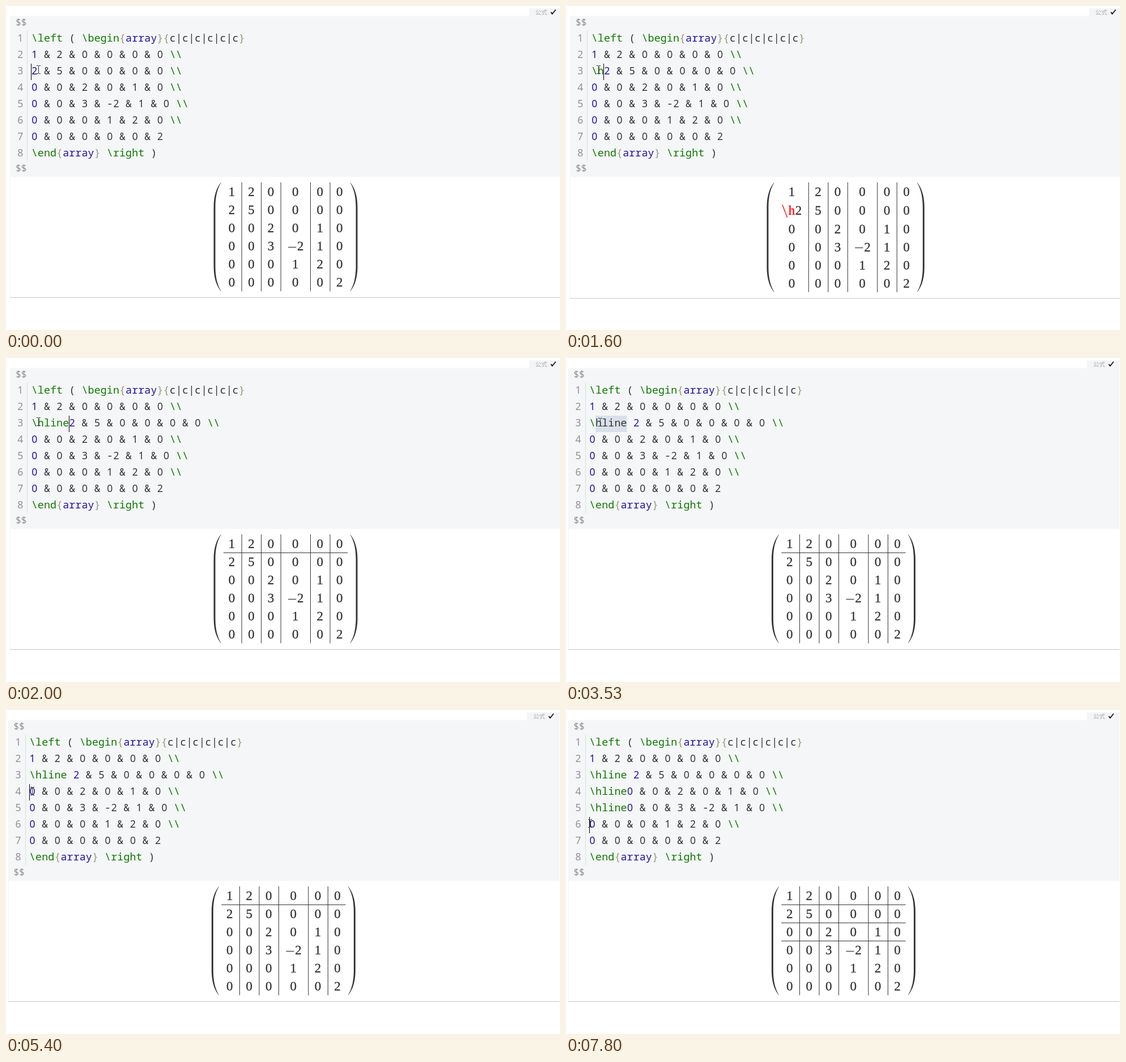
These frames come from a looping animation (978 px wide and 573 px high, 8 s). An HTML page with a canvas:

```html
<!DOCTYPE html>
<html lang="en">
<head>
<meta charset="utf-8">
<title>Matrix editor</title>
<style>
html, body { margin: 0; width: 100%; height: 100%; overflow: hidden; background: #fff; }
canvas { display: block; }
</style>
</head>
<body>
<canvas id="stage" width="978" height="573"></canvas>
<script>
const ctx = document.getElementById('stage').getContext('2d');

const LOOP = 8000, TICKS_PER_MS = 15 / 1000;
const CELL = 11.09, LINE = 29, EM = 23, INDENT = 37.3;
const LEFT = 7.4, LEFT_SCROLL = 3.7;
const MONO = '"Noto Sans Mono", "DejaVu Sans Mono", monospace';
const SANS = '"Noto Sans", "Open Sans", sans-serif';
const SERIF = '"Liberation Serif", "Noto Serif", serif';
const INK = '#333', GREEN = '#117700', BLUE = '#221199', BRACE = '#999977';

const ROWS = ['1 2 0 0 0 0', '2 5 0 0 0 0', '0 0 2 0 1 0',
  '0 0 3 -2 1 0', '0 0 0 1 2 0', '0 0 0 0 0 2'].map(r => r.split(' '));

// Times below are in ticks of 1/15 s.
const EDITS = [19, 24, 25, 27, 28, 30, 37, 86, 100];
const CARETS = [[-6, 3, 0], [19, 3, 1], [24, 3, 2], [25, 3, 3], [27, 3, 4], [28, 3, 5],
  [30, 3, 6], [37, 3, 7], [61, 3, 6], [81, 4, 0], [86, 4, 6], [95, 5, 0], [100, 5, 6], [117, 6, 0]];
const MOUSE = [[0, 57, 112], [44, 57, 112], [48, 59, 113], [52, 59, 113], [53, 60, 113],
  [59, 108, 114], [61, 108, 114], [73, 43, 114], [75, 43, 114], [81, 46, 143], [86, 46, 143],
  [89, 48, 152], [92, 48, 152], [95, 47, 173], [102, 47, 173], [108, 46, 201],
  [111, 46, 201], [113, 46, 200], [114, 46, 200], [117, 42, 200], [120, 42, 200]];

function rect(x, y, w, h, color) {
  ctx.fillStyle = color;
  ctx.fillRect(x, y, w, h);
}

function text(s, x, y, font, color, align = 'center') {
  ctx.font = font;
  ctx.fillStyle = color;
  ctx.textAlign = align;
  ctx.fillText(s, x, y);
}

function mouseAt(tick) {
  const i = MOUSE.findIndex(k => k[0] > tick);
  const [t0, x0, y0] = MOUSE[i - 1], [t1, x1, y1] = MOUSE[i];
  const p = (tick - t0) / (t1 - t0);
  return [Math.round(x0 + (x1 - x0) * p), Math.round(y0 + (y1 - y0) * p)];
}

function selection(tick, mouseX) {
  if (tick >= 48 && tick < 61) return [1, 6];
  if (tick > 61 && tick < 81) {
    return [Math.max(0, Math.round((mouseX - LEFT_SCROLL - INDENT) / CELL)), 6];
  }
  return null;
}

// Each line is a list of [string, color] tokens.
function codeLines(edits) {
  const prefix = ['', '\\hline '.slice(0, Math.min(edits, 7)),
    edits > 7 ? '\\hline' : '', edits > 8 ? '\\hline' : '', '', ''];
  const body = ROWS.map((row, i) => [
    [prefix[i], GREEN],
    [row[0], prefix[i] === '\\' ? GREEN : BLUE],
    [' & ' + row.slice(1).join(' & ') + ' ', INK],
    [i < 5 ? '\\\\' : '', GREEN]
  ]);
  const array = [['{', BRACE], ['array', BLUE], ['}', BRACE]];
  return [
    [['\\left', GREEN], [' ( ', INK], ['\\begin', GREEN], ...array,
      ['{', BRACE], ['c|c|c|c|c|c', INK], ['}', BRACE]],
    ...body,
    [['\\end', GREEN], ...array, [' ', INK], ['\\right', GREEN], [' )', INK]]
  ];
}

function codeChar(ch, x, y, color) {
  const font = /[0-9]/.test(ch) ? '17.6px ' + SANS : '18.4px ' + MONO;
  text(ch, x, y, font, color);
}

function drawEditor(edits, left, right, sel) {
  const x0 = left + INDENT;
  rect(left + 916, 4, right - left - 916, 14, '#f4f5f7');
  rect(left, 18, right - left, 284.5, '#f4f6f8');
  text('公式', left + 927, 15, '10.5px "Noto Sans CJK SC", "Noto Sans CJK", sans-serif', '#aaa', 'left');
  ctx.strokeStyle = '#222';
  ctx.lineWidth = 2;
  ctx.beginPath();
  ctx.moveTo(left + 954.5, 11);
  ctx.lineTo(left + 957, 14);
  ctx.lineTo(left + 963, 6.5);
  ctx.stroke();

  rect(Math.round(left + 30), 43, 1, 232, '#dcdddf');
  for (const y of [35, 293]) text('$$', left + 9.5, y, '16.5px ' + MONO, '#8c8c8c', 'left');
  if (sel) rect(x0 + sel[0] * CELL, 102, (sel[1] - sel[0]) * CELL, LINE, '#d8e1e9');

  codeLines(edits).forEach((tokens, i) => {
    const y = 63 + i * LINE;
    codeChar(String(i + 1), left + 17.8, y, '#919191');
    let col = 0;
    for (const [str, color] of tokens) {
      for (const ch of str) {
        const marked = sel && i === 2 && col >= sel[0] && col < sel[1];
        if (ch !== ' ') codeChar(ch, x0 + (col + 0.5) * CELL, y, marked ? INK : color);
        col++;
      }
    }
  });
}

function drawCaret(tick, left, sel) {
  if (sel) return;
  const [start, row, col] = CARETS.filter(c => c[0] <= tick).pop();
  if (Math.floor((tick - start) / 8) % 2) return;
  rect(Math.floor(left + INDENT + col * CELL), 44 + (row - 1) * LINE, 1, LINE, '#000');
}

function drawMouse(x, y) {
  rect(x, y - 6, 1, 13, INK);
  for (const dy of [-7, 7]) {
    rect(x - 3, y + dy, 3, 1, INK);
    rect(x + 1, y + dy, 3, 1, INK);
  }
}

function paren(tip, outer, top, bottom) {
  const d = Math.sign(tip - outer), x = k => outer + d * k;
  const hook = 44, thick = 2.9;
  ctx.fillStyle = INK;
  ctx.beginPath();
  ctx.moveTo(tip, top);
  ctx.bezierCurveTo(x(4.5), top + 10, outer, top + 25, outer, top + hook);
  ctx.lineTo(outer, bottom - hook);
  ctx.bezierCurveTo(outer, bottom - 25, x(4.5), bottom - 10, tip, bottom);
  ctx.lineTo(tip, bottom - 0.8);
  ctx.bezierCurveTo(x(6.5), bottom - 11, x(thick), bottom - 25, x(thick), bottom - hook);
  ctx.lineTo(x(thick), top + hook);
  ctx.bezierCurveTo(x(thick), top + 25, x(6.5), top + 11, tip, top + 0.8);
  ctx.closePath();
  ctx.fill();
}

const charWidth = ch => EM * ('hn'.includes(ch) ? 0.556 : 'li'.includes(ch) ? 0.278 : 0.5);

function mathChar(ch, x, y, color) {
  text(ch, x, y, EM + 'px ' + SERIF, color);
  ctx.strokeStyle = color;
  ctx.lineWidth = 0.3;
  ctx.strokeText(ch, x, y);
}

function mathCell(str, cx, y, redCount) {
  if (str[0] === '-') {
    const x = cx - 14.7;
    rect(x + 1.9, Math.round(y - 6.3), 14.2, 1.2, INK);
    mathChar(str[1], x + 23.6, y, INK);
    return;
  }
  let x = cx - [...str].reduce((w, ch) => w + charWidth(ch), 0) / 2;
  [...str].forEach((ch, i) => {
    const w = charWidth(ch), color = i < redCount ? '#f00' : INK;
    if (ch === '\\') {
      ctx.strokeStyle = color;
      ctx.lineWidth = 1.3;
      ctx.beginPath();
      ctx.moveTo(x + 1.5, y - 17);
      ctx.lineTo(x + 10, y + 5.5);
      ctx.stroke();
    } else {
      mathChar(ch, x + w / 2, y, color);
    }
    x += w;
  });
}

function drawPreview(edits, left, right) {
  const broken = edits > 0 && edits < 6;
  const bad = broken ? '\\hline'.slice(0, edits) : '';
  const grow = broken ? 1.6 : 0;
  const bottom = 504.5 + grow;
  const widths = [0.5, 0.5, 0.5, 1.278, 0.5, 0.5].map(w => w * EM);
  widths[0] += [...bad].reduce((w, ch) => w + charWidth(ch), 0);
  const total = widths.reduce((a, b) => a + b) + 5 * EM;
  const x0 = left + 486.2 - total / 2;

  const edge = 515 + grow;
  rect(left, 302.5, 1, edge - 302, '#f4f4f4');
  rect(left, edge, right - left, 1, '#c6c6c6');

  paren(x0 - 13.2, x0 - 26, 312, bottom);
  paren(x0 + total + 13.2, x0 + total + 26, 312, bottom);

  let x = x0;
  widths.forEach((w, c) => {
    ROWS.forEach((row, r) => {
      const y = 336 + r * 32.05 + (r > 1 ? grow : r * grow * 0.3);
      const wrong = broken && c === 0 && r === 1;
      const red = wrong ? Math.max(2, bad.length) : 0;
      mathCell(wrong ? bad + row[c] : row[c], x + w / 2, y, red);
    });
    x += w + EM;
    if (c < 5) rect(x - EM / 2, 312, 1, bottom - 312, INK);
  });

  const rules = edits < 6 ? 0 : Math.max(1, edits - 6);
  for (let i = 0; i < rules; i++) {
    rect(x0 - 8.7, 344 + i * 32, total + 17.4, 1, INK);
  }
}

function draw() {
  const t = performance.now() % LOOP;
  const tick = Math.min(119, Math.floor((t + 5) * TICKS_PER_MS));
  const edits = EDITS.filter(e => e <= tick).length;
  const scrolled = edits % 2 === 1;  // the page scrollbar toggles with each edit
  const left = scrolled ? LEFT_SCROLL : LEFT;
  const right = scrolled ? 977 : 978;
  const [mx, my] = mouseAt(tick);
  const sel = selection(tick, mx);

  rect(0, 0, 978, 573, '#fff');
  drawEditor(edits, left, right, sel);
  drawPreview(edits, left, right);
  drawCaret(tick, left, sel);
  drawMouse(mx, my);
  requestAnimationFrame(draw);
}
draw();
</script>
</body>
</html>
```
